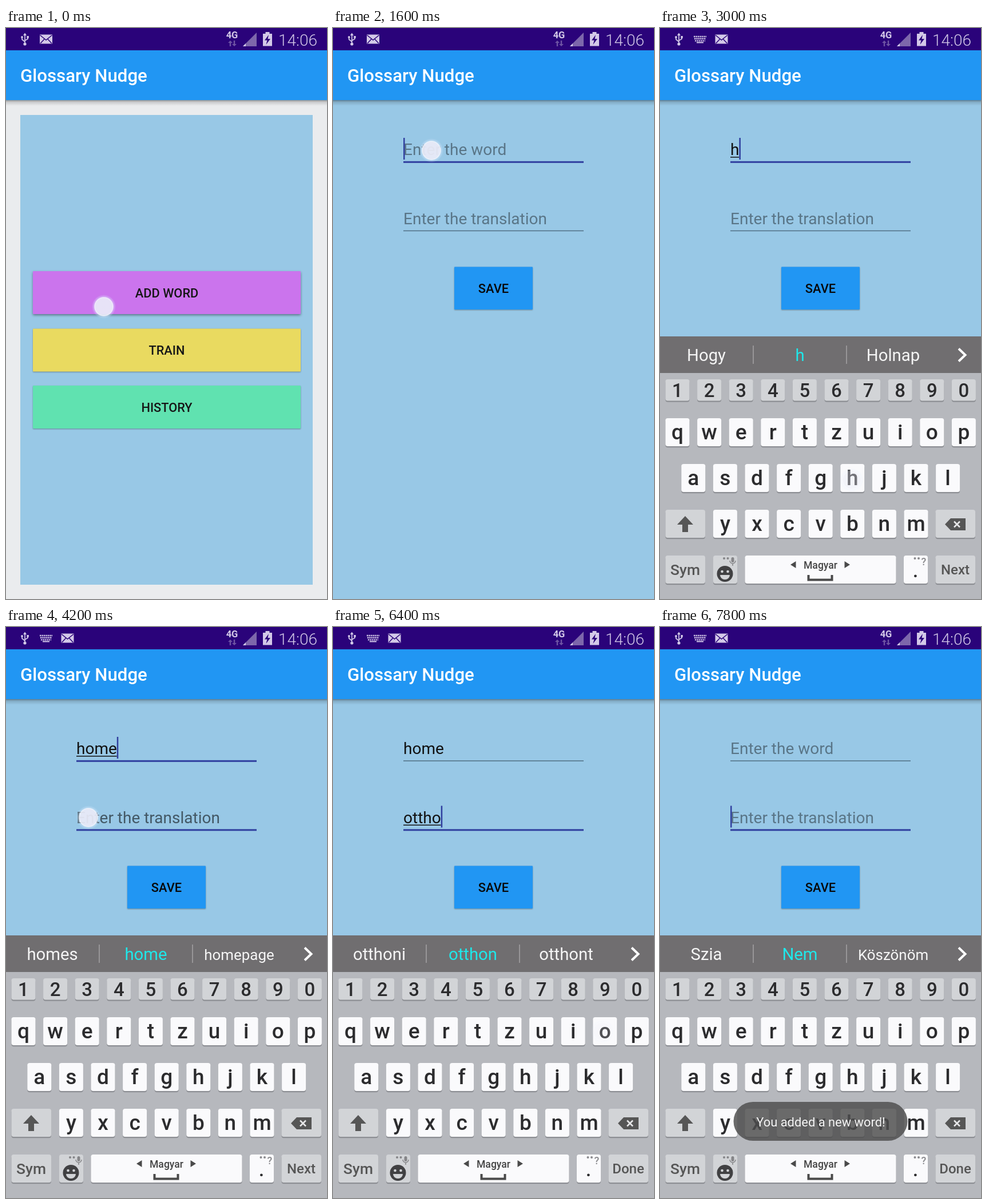
Recreate the animation shown at these times as an HTML page. Size 561 by 998 pixels, loop 8 s.

```html
<!DOCTYPE html>
<html lang="en">
<head>
<meta charset="utf-8">
<title>Vocabulary trainer</title>
<style>
html, body { margin: 0; width: 100%; height: 100%; overflow: hidden; background: #eaecee; }
svg { display: block; width: 100%; height: 100%; font-family: Roboto, "Noto Sans", sans-serif; }
text { white-space: pre; }
.btn { filter: drop-shadow(0 1.5px 1px rgba(0, 0, 0, .35)); }
.raised { filter: drop-shadow(0 2px 2px rgba(0, 0, 0, .42)); }
</style>
</head>
<body>
<script>
const LOOP = 8000, STEP = 200;
const NS = 'http://www.w3.org/2000/svg';
const INDIGO = '#303f9f', BLUE = '#2196f3', SKY = '#98c8e6', DEEP = '#2a037a', PALE = '#d3c9e8';

function el(tag, attrs, parent) {
  const node = document.createElementNS(NS, tag);
  for (const k in attrs) node.setAttribute(k, attrs[k]);
  parent.appendChild(node);
  return node;
}
const group = (parent) => el('g', {}, parent);
const rect = (p, x, y, width, height, fill, rx = 0, more = {}) =>
  el('rect', { x, y, width, height, fill, rx, ...more }, p);
const path = (p, d, fill, more = {}) => el('path', { d, fill, ...more }, p);
const stroke = (p, d, color, width, more = {}) =>
  path(p, d, 'none', { stroke: color, 'stroke-width': width, ...more });
const disc = (p, cx, cy, r, fill) => el('circle', { cx, cy, r, fill }, p);
function label(p, str, x, y, size, fill, weight = 400, anchor = 'middle') {
  const t = el('text', { x, y, fill, 'font-size': size, 'font-weight': weight, 'text-anchor': anchor }, p);
  t.textContent = str;
  return t;
}
const clamp = (v) => Math.min(1, Math.max(0, v));
const show = (node, on) => node.setAttribute('visibility', on ? 'visible' : 'hidden');

const svg = el('svg', { viewBox: '0 0 561 998', preserveAspectRatio: 'none' }, document.body);
const defs = el('defs', {}, svg);
function gradient(tag, id, attrs, stops) {
  const g = el(tag, { id, ...attrs }, defs);
  for (const [offset, color, alpha] of stops)
    el('stop', { offset, 'stop-color': color, 'stop-opacity': alpha }, g);
}
gradient('linearGradient', 'shade', { x2: 0, y2: 1 }, [[0, '#000', .38], [.35, '#000', .14], [1, '#000', 0]]);
gradient('radialGradient', 'glow', {}, [[.7, '#dbe9ff', .7], [1, '#dbe9ff', 0]]);

function appBar(p) {
  rect(p, 0, 0, 561, 39.5, DEEP);
  rect(p, 0, 126, 561, 10, 'url(#shade)');
  rect(p, 0, 39, 561, 87, BLUE);
  label(p, 'Glossary Nudge', 25, 94, 31.2, '#fff', 500, 'start');
}

// Menu
const menu = group(svg);
rect(menu, 0, 0, 561, 998, '#eaecee');
rect(menu, 25, 152, 511, 821, SKY);
[['ADD WORD', 425, '#cb74ed', 'raised'], ['TRAIN', 525.5, '#e9da60', 'btn'], ['HISTORY', 625, '#60e2b0', 'btn']]
  .forEach(([name, y, fill, cls]) => {
    rect(menu, 47, y, 468, 75, fill, 1, { class: cls });
    label(menu, name, 281, y + 45.5, 21.8, '#161616', 500);
  });
appBar(menu);

// Word form
const form = group(svg);
rect(form, 0, 0, 561, 998, SKY);
function makeField(y, hint) {
  const g = group(form);
  return {
    hint: label(g, hint, 123, y, 28, '#000', 400, 'start'),
    text: label(g, '', 123, y, 28, '#111', 400, 'start'),
    under: rect(g, 123, y + 3, 0, 1.5, '#111'),
    thin: rect(g, 123, y + 11.2, 315, 1.5, '#506f84'),
    thick: rect(g, 123, y + 10.8, 315, 3, INDIGO),
    caret: rect(g, 123, y - 30, 2.5, 38, INDIGO)
  };
}
const word = makeField(222, 'Enter the word');
const meaning = makeField(342.5, 'Enter the translation');
rect(form, 212, 417.5, 137, 74.5, BLUE, 1, { class: 'btn' });
label(form, 'SAVE', 280.5, 463, 21.8, '#080808', 500);
appBar(form);

function setField(f, text, { focus = false, caret = false, composing = false, pressed = false }) {
  f.text.textContent = text;
  const w = text ? f.text.getComputedTextLength() : 0;
  show(f.hint, !text);
  f.hint.setAttribute('fill-opacity', pressed ? .56 : .41);
  f.under.setAttribute('width', composing ? w : 0);
  f.caret.setAttribute('x', 123 + w);
  show(f.caret, caret);
  show(f.thick, focus || pressed);
  show(f.thin, !(focus || pressed));
}

// Keyboard
const board = group(svg);
const PITCH = 55.6, LEFT = 9.5, KEY = 42;
const DARK = '#565656';
rect(board, 0, 539, 561, 459, '#b6b8bd');
rect(board, 0, 539, 561, 64, '#706e70');
for (const x of [163, 326]) rect(board, x - .6, 555, 1.2, 32, '#b4b2b4');
stroke(board, 'M522 560.5L533.5 571.5L522 582.5', '#fff', 4);
const guesses = [81, 244.5, 407.5].map((x, i) => label(board, '', x, 582, 29.3, i === 1 ? '#1ee8ea' : '#f5f5f5'));

function key(x, y, w, h, fill) {
  rect(board, x, y + 2.3, w, h, '#8d8f94', 4);
  rect(board, x, y, w, h, fill, 4);
}
const LIGHT = '#fafafc', GREY = '#d2d4d7';
function row(chars, x, y, h, fill, size, base) {
  [...chars].forEach((c, i) => {
    const kx = x + i * PITCH;
    key(kx, y, KEY, h, fill);
    label(board, c, kx + KEY / 2, base, size, '#2c2c2e', 500);
  });
}
row('1234567890', LEFT, 614, 37.5, GREY, 33, 644.5);
row('qwertzuiop', LEFT, 682, 49, LIGHT, 37, 719);
row('asdfghjkl', LEFT + PITCH / 2, 762, 49, LIGHT, 37, 799);
row('yxcvbnm', LEFT + PITCH * 1.5, 842, 49, LIGHT, 37, 879);

for (const y of [842, 922]) for (const x of [LEFT, 481.5]) key(x, y, 69.5, 49, GREY);
path(board, 'M44 853L58 868H49V881H39V868H30Z', DARK);
path(board, 'M498 867.5L508 857H534V878H508Z', DARK);
stroke(board, 'M514 862.5L524 872.5M524 862.5L514 872.5', '#e6e6e8', 2.6);
label(board, 'Sym', 44, 955.5, 26.5, DARK, 500);
const action = label(board, 'Next', 516, 955, 24, DARK, 500);

key(93, 922, KEY, 49, GREY);
disc(board, 113.5, 954, 14, '#414143');
for (const x of [108.5, 118.5]) disc(board, x, 950, 2.3, GREY);
path(board, 'M105 956H122A8.5 8 0 0 1 105 956Z', GREY);
for (const x of [112, 118.5]) disc(board, x, 927, 2, '#858588');
rect(board, 124.5, 925, 5, 9, '#858588', 2.5);
stroke(board, 'M122 931A5 5 0 0 0 132 931M127 936V940', '#858588', 1.5);

key(148.5, 922, 264, 49, LIGHT);
label(board, 'Magyar', 280.5, 944.5, 17.6, '#444', 500);
path(board, 'M237.5 932V944L228 938ZM322.5 932V944L332 938Z', '#4a4a4a');
stroke(board, 'M259.5 956V964.5H300.5V956', '#4a4a4a', 4);

key(426, 922, KEY, 49, LIGHT);
label(board, '.', 446.5, 960, 34, '#2c2c2e', 500);
for (const x of [445.5, 452]) disc(board, x, 927, 2, '#8a8a8d');
label(board, '?', 461, 939, 18, '#8a8a8d', 500);

// Toast and touch marker
const toast = group(svg);
rect(toast, 128.5, 830, 304, 68, 'rgba(78,78,78,.83)', 34);
label(toast, 'You added a new word!', 281, 873, 21.9, '#f4f4f4');

const dot = group(svg);
disc(dot, 0, 0, 21, 'url(#glow)');
el('circle', { r: 16, fill: '#ecebf6', 'fill-opacity': .78, stroke: '#fff', 'stroke-opacity': .55, 'stroke-width': 1.5 }, dot);

// Status icons
const status = group(svg);
stroke(status, 'M33 12V27M28 16V20L33 24M38 16V19L33 22', PALE, 1.7);
path(status, 'M33 8.5L36 13H30Z', PALE);
disc(status, 33, 28, 2.6, PALE);
disc(status, 28, 16, 1.9, PALE);
rect(status, 36.3, 14, 3.6, 3.6, PALE);
const keysIcon = group(status);
[15, 18.7, 22.4].forEach((y, i) =>
  stroke(keysIcon, `M${59 + i} ${y}H${81 - i}`, PALE, 2.4, { 'stroke-dasharray': '2.4 1' }));
stroke(keysIcon, 'M64 25.4H76', PALE, 2);
const mail = group(status);
rect(mail, 59, 11.5, 22, 16, PALE);
stroke(mail, 'M59.5 12.5L70 21L80.5 12.5M60 27L67 19.5M80 27L73 19.5', DEEP, 1.5);
label(status, '4G', 395, 18, 16.5, PALE, 700);
path(status, 'M392 22L396 26H393.2V32H390.8V26H388ZM399 32L395 28H397.8V22H400.2V28H403Z', '#6e54a3');
path(status, 'M438 8V32H414Z', '#7d67ab');
path(status, 'M419 27V32H414Z', PALE);
path(status, 'M453.5 7H460.5V10H465V31.5H449V10H453.5Z', PALE);
path(status, 'M459 12L452 21.5H456.5L454.5 29L462 19H457.5Z', DEEP);
label(status, '14:06', 476, 31, 28, PALE, 300, 'start');

// Timeline: [time, value], the latest entry that has begun applies
const at = (table, t) => table.reduce((v, [start, value]) => (t >= start ? value : v), table[0][1]);

const wordSteps = [[0, ''], [3000, 'h'], [3200, 'ho'], [3600, 'hom'], [3800, 'home'], [7400, '']];
const meaningSteps = [[0, ''], [5000, 'o'], [5400, 'ot'], [5800, 'ott'], [6000, 'otth'], [6400, 'ottho'], [6800, 'otthon'], [7400, '']];
const guessSteps = [
  [0, 'Szia Nem Köszönöm'], [3000, 'Hogy h Holnap'], [3200, 'Hogy ho Hol'], [3600, 'homok hom home'],
  [3800, 'homes home homepage'], [4400, 'Szia Nem Köszönöm'], [5000, 'Ok o Ott'], [5400, 'Ott ot Otthon'],
  [5800, 'otthon ott ottani'], [6000, 'otthoni otthon otthont'], [7600, 'Szia Nem Köszönöm']
];
const caretSteps = [[0, true], [1200, false], [1600, true], [2000, false], [2200, true], [2400, false], [2600, true]];
// press, release, x, y
const touches = [
  [0, 100, 171, 487], [1550, 1650, 172, 214], [2700, 2850, 335, 790], [3100, 3200, 474, 709],
  [3380, 3480, 446, 868], [3600, 3700, 142, 708], [4150, 4280, 144, 333], [4780, 4900, 472, 708],
  [5180, 5280, 253, 708], [5580, 5680, 253, 708], [5820, 5920, 335, 788], [6100, 6200, 471, 707],
  [6580, 6680, 391, 868], [7150, 7260, 284, 458]
];
const FADE = 250;

function draw(t) {
  const slide = clamp((t - 196) / 350), fade = clamp((t - 196) / 200);
  form.setAttribute('transform', `translate(0 ${80 * (1 - slide) ** 5})`);
  form.setAttribute('opacity', 1 - (1 - fade) ** 4);
  show(menu, t < 600);

  const second = t >= 4400;
  setField(word, at(wordSteps, t), {
    focus: !second, caret: !second && at(caretSteps, t), composing: !second
  });
  setField(meaning, at(meaningSteps, t), {
    focus: second, caret: second, composing: second, pressed: t >= 4150 && !second
  });

  const rise = clamp((t - 1900) / 200);
  board.setAttribute('transform', `translate(0 ${118 * (1 - rise)})`);
  board.setAttribute('opacity', rise);
  at(guessSteps, t).split(' ').forEach((g, i) => {
    guesses[i].textContent = g;
    guesses[i].setAttribute('font-size', g.length > 7 ? 25.9 : 29.3);
  });
  action.textContent = second ? 'Done' : 'Next';
  keysIcon.setAttribute('opacity', rise > 0 ? 1 : 0);
  mail.setAttribute('transform', `translate(${rise > 0 ? 37.5 : 0} 0)`);

  toast.setAttribute('opacity', clamp((t - 7500) / 300));

  const touch = touches.find(([down, up]) => t >= down && t < up + FADE);
  dot.setAttribute('opacity', touch ? 1 - clamp((t - touch[1]) / FADE) : 0);
  if (touch) dot.setAttribute('transform', `translate(${touch[2]} ${touch[3]})`);
}

const begin = performance.now();
let last = -1;
function tick() {
  const t = Math.floor(((performance.now() - begin) % LOOP) / STEP) * STEP;
  if (t !== last) draw(last = t);
  requestAnimationFrame(tick);
}
tick();
</script>
</body>
</html>
```
